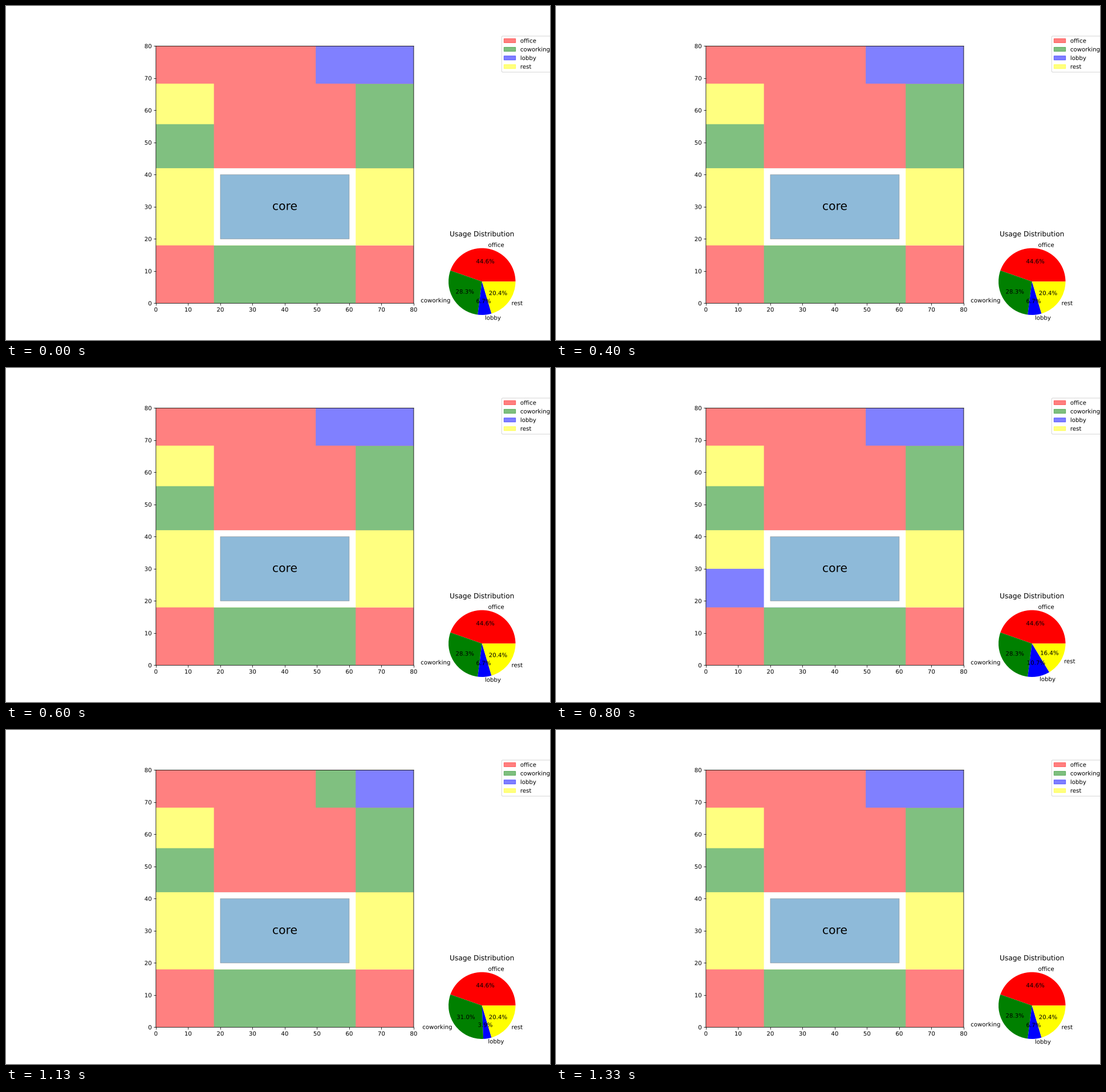
These frames come from a looping animation (954x587 px, 1360 ms). A matplotlib script:

```python
import matplotlib.pyplot as plt
from matplotlib.animation import FuncAnimation
from matplotlib.colors import to_rgb
from matplotlib.patches import Patch, Rectangle
from matplotlib.patheffects import Normal

# Smooth edges and outline text, both placed at fractions of a pixel.
plt.rcParams.update({"path.snap": False, "path.effects": [Normal()], "text.hinting": "none"})

STEP = 10      # ms per frame
LOOP = 1360    # ms per loop
COLORS = {"office": "red", "coworking": "green", "lobby": "blue", "rest": "yellow"}

# x0, y0, x1, y1, use (None: left empty), in painting order
ROOMS = {
    "south west": (0, 0, 18, 18, "office"),
    "south": (18, 0, 62, 18, "coworking"),
    "south east": (62, 0, 80, 18, "office"),
    "west low": (0, 18, 18, 30, "rest"),
    "west high": (0, 30, 18, 42, "rest"),
    "middle": (18, 18, 62, 42, None),
    "east": (62, 18, 80, 42, "rest"),
    "west wing": (0, 42, 18, 55.7, "coworking"),
    "west lounge": (0, 55.7, 18, 68.3, "rest"),
    "hall": (18, 42, 62, 68.3, "office"),
    "east wing": (62, 42, 80, 68.3, "coworking"),
    "north west": (0, 68.3, 37.9, 80, "office"),
    "north mid": (37.9, 68.3, 49.6, 80, "office"),
    "north": (49.6, 68.3, 62, 80, "lobby"),
    "north east": (62, 68.3, 80, 80, "lobby"),
}

# start in ms, room tried with another use, that use (None: the plain layout)
TRIALS = [
    (0, None, None),
    (100, "east", "coworking"),
    (200, None, None),
    (300, "west lounge", "lobby"),
    (400, None, None),
    (500, "west high", "office"),
    (600, None, None),
    (700, "west wing", "lobby"),
    (800, "west low", "lobby"),
    (900, None, None),
    (1000, "west high", "coworking"),
    (1100, None, None),
    (1130, "north", "coworking"),
    (1230, "north mid", "lobby"),
    (1330, None, None),
]


def tint(use):
    """Colour of a use, half mixed with white."""
    return tuple((1 + c) / 2 for c in to_rgb(COLORS.get(use, "white")))


fig = plt.figure(figsize=(13, 8), dpi=954.001 / 13)

plan = fig.add_subplot()
plan.set(xlim=(0, 80), ylim=(0, 80), aspect="equal")
# Each room is painted up to the top right corner; later rooms cover the rest.
cells = {}
for name, (x0, y0, _, _, use) in ROOMS.items():
    cells[name] = plan.add_patch(Rectangle(
        (x0, y0), 80 - x0, 80 - y0, facecolor=tint(use), edgecolor="none", lw=0))
plan.add_patch(Rectangle((20, 20), 40, 20, facecolor="tab:blue", edgecolor="gray", alpha=0.5))
plan.text(40, 30, "core", ha="center", va="center", fontsize=20)
plan.legend(handles=[Patch(color=c, alpha=0.5, label=u) for u, c in COLORS.items()],
            loc="upper left", bbox_to_anchor=(1.33, 1.05), labelspacing=0.54)

chart = fig.add_axes([0.75, 0.05, 0.25, 0.25])
chart.set_title("Usage Distribution")


def layout(room, use):
    """Use of every room, with one room changed."""
    uses = {name: spec[4] for name, spec in ROOMS.items()}
    if room:
        uses[room] = use
    return uses


def draw_pie(uses):
    """Draw the share of each use and return the artists."""
    areas = dict.fromkeys(COLORS, 0)
    for name, (x0, y0, x1, y1, _) in ROOMS.items():
        if uses[name]:
            areas[uses[name]] += (x1 - x0) * (y1 - y0)
    parts = chart.pie(list(areas.values()), labels=list(areas),
                      colors=list(COLORS.values()), autopct="%.1f%%")
    return [artist for group in parts for artist in group]


layouts = {(room, use): layout(room, use) for _, room, use in TRIALS}
pies = {key: draw_pie(uses) for key, uses in layouts.items()}


def update(i):
    now = i * STEP
    current = [(room, use) for start, room, use in TRIALS if start <= now][-1]
    for name, use in layouts[current].items():
        cells[name].set_facecolor(tint(use))
    for key, artists in pies.items():
        for artist in artists:
            artist.set_visible(key == current)
    return []


anim = FuncAnimation(fig, update, frames=LOOP // STEP, interval=STEP,
                     init_func=lambda: update(0), repeat=True, repeat_delay=0)
plt.show()
```
